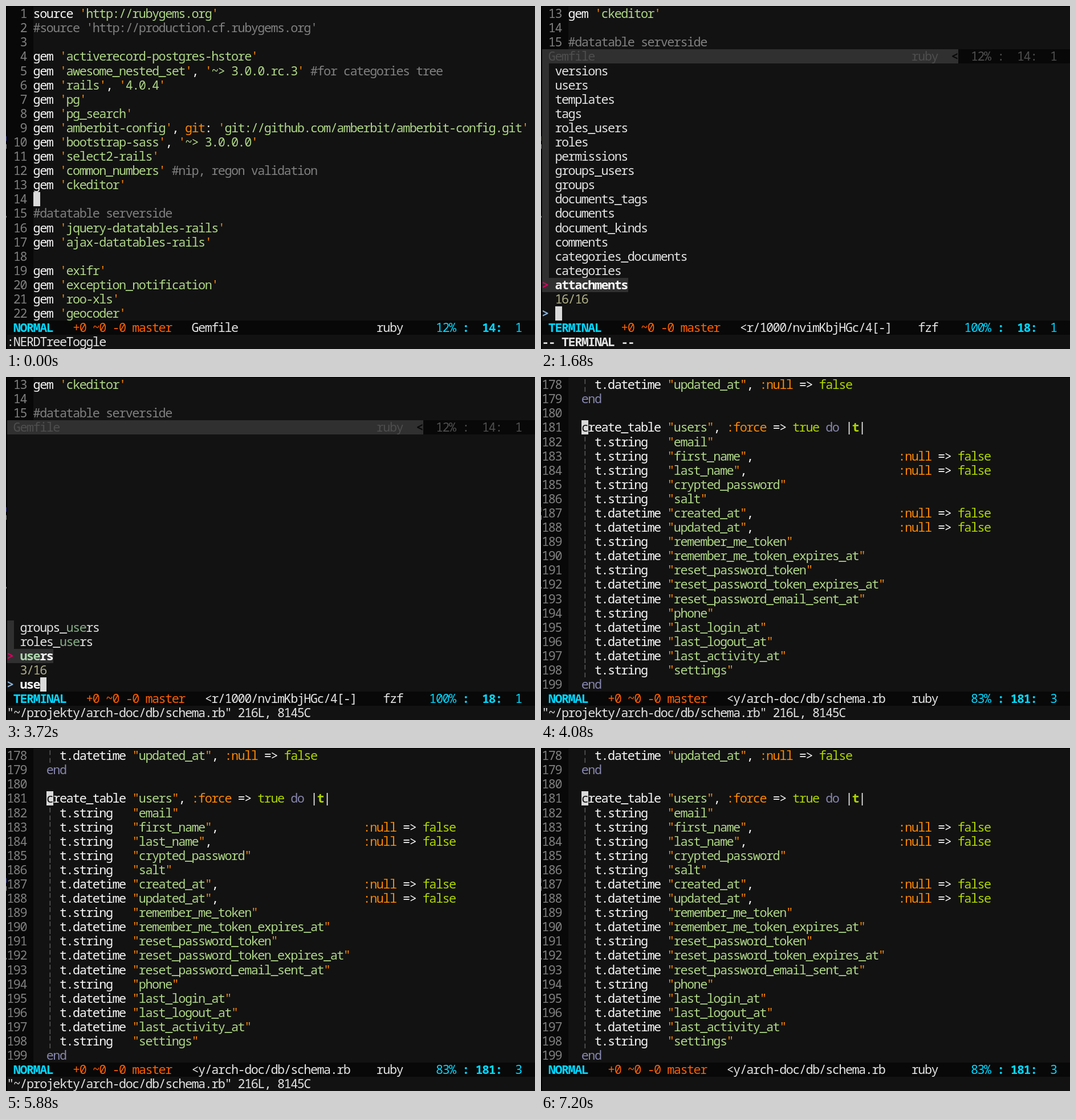
These frames come from a looping animation (928 px wide and 603 px high, 8000 ms). An HTML page with a canvas:

```html
<!DOCTYPE html>
<html lang="en">
<head>
<meta charset="utf-8">
<title>Editor session</title>
<style>
  html, body { margin: 0; width: 100%; height: 100%; overflow: hidden; background: #000; }
  canvas { display: block; }
</style>
</head>
<body>
<canvas id="screen" width="928" height="603"></canvas>
<script>
const ctx = document.getElementById('screen').getContext('2d');
const LOOP = 8000, CELL = 11.58, LINE = 25.09, LEFT = 2, TOP = 1;
const BG = '#121212', DARK = '#080808', PANEL = '#303030', FG = '#f8f8f8', SOFT = '#e4e4e4',
  GREY = '#808080', ORANGE = '#ff8700', GREEN = '#afd787', LIME = '#afd700', MUTED = '#8787af',
  DIM = '#4e4e4e', CYAN = '#00d7ff', YELLOW = '#d7d700', CURSOR = '#dadada', BLUE = '#3465a4';

const gemfile = `source 'http://rubygems.org'
#source 'http://production.cf.rubygems.org'

gem 'activerecord-postgres-hstore'
gem 'awesome_nested_set', '~> 3.0.0.rc.3' #for categories tree
gem 'rails', '4.0.4'
gem 'pg'
gem 'pg_search'
gem 'amberbit-config', git: 'git://github.com/amberbit/amberbit-config.git'
gem 'bootstrap-sass', '~> 3.0.0.0'
gem 'select2-rails'
gem 'common_numbers' #nip, regon validation
gem 'ckeditor'

#datatable serverside
gem 'jquery-datatables-rails'
gem 'ajax-datatables-rails'

gem 'exifr'
gem 'exception_notification'
gem 'roo-xls'
gem 'geocoder'`.split('\n');

const column = (type, name, required) => {
  const start = `  ¦ t.${type.padEnd(8)} "${name}"`;
  return required ? (start + ',').padEnd(50) + ':null => false' : start;
};
const schema = [
  '  ¦ t.datetime "updated_at", :null => false', '  end', '',
  '  create_table "users", :force => true do |t|',
  column('string', 'email'),
  column('string', 'first_name', true),
  column('string', 'last_name', true),
  column('string', 'crypted_password'),
  column('string', 'salt'),
  column('datetime', 'created_at', true),
  column('datetime', 'updated_at', true),
  column('string', 'remember_me_token'),
  column('datetime', 'remember_me_token_expires_at'),
  column('string', 'reset_password_token'),
  column('datetime', 'reset_password_token_expires_at'),
  column('datetime', 'reset_password_email_sent_at'),
  column('string', 'phone'),
  column('datetime', 'last_login_at'),
  column('datetime', 'last_logout_at'),
  column('datetime', 'last_activity_at'),
  column('string', 'settings'),
  '  end'
];

const tables = `attachments categories categories_documents comments document_kinds documents
documents_tags groups groups_users permissions roles roles_users tags templates users versions`.split(/\s+/);

const x = col => LEFT + col * CELL;
const y = row => TOP + row * LINE;

function box(row, col, width, color) {
  const left = Math.round(x(col)), top = Math.round(y(row));
  ctx.fillStyle = color;
  ctx.fillRect(left, top, Math.round(x(col + width)) - left, Math.round(y(row + 1)) - top);
}

function text(row, col, string, color = FG, bold = false) {
  ctx.font = `${bold ? 700 : 500} 21.8px "Noto Sans Mono", monospace`;
  ctx.textAlign = 'center';
  ctx.fillStyle = color;
  [...string].forEach((char, i) => {
    if (char !== ' ') ctx.fillText(char, x(col + i + 0.5), y(row) + 20.2);
  });
}

function code(row, line) {
  const tokens = /#.*|'[^']*'|"[^"]*"|:\w+|\w+(?=:)|\b(?:true|false)\b|\b(?:end|do)\b|\|t\||¦/g;
  let end = 0;
  for (const { 0: token, index } of line.matchAll(tokens)) {
    const col = 4 + index;
    text(row, 4 + end, line.slice(end, index));
    end = index + token.length;
    if (token[0] === '#') text(row, col, token, GREY);
    else if (/['"]/.test(token[0])) {
      text(row, col, token[0], ORANGE);
      text(row, col + 1, token.slice(1, -1), GREEN);
      text(row, 3 + end, token[0], ORANGE);
    } else if (token === '|t|') {
      text(row, col, '| |');
      text(row, col + 1, 't', LIME, true);
    } else if (token === '¦') text(row, col, token, '#585858');
    else text(row, col, token, /true|false/.test(token) ? LIME : /^(end|do)$/.test(token) ? MUTED : ORANGE);
  }
  text(row, 4 + end, line.slice(end));
}

function buffer(lines, first) {
  lines.forEach((line, row) => {
    box(row, 0, 4, DARK);
    text(row, 0, String(first + row).padStart(3), GREY);
    code(row, line);
  });
}

function status(mode, file, type, percent, line, col, color = CYAN) {
  const git = mode.length > 6 ? 12 : 10;
  box(22, 0, 80, DARK);
  text(22, 1, mode, color, true);
  text(22, git, '+0 ~0 -0 master', '#ff5f00');
  text(22, git + 18, file, SOFT);
  text(22, 60 - type.length, type, SOFT);
  text(22, 64, `${percent}%`.padStart(4), color);
  text(22, 69, ':', color, true);
  text(22, 71, `${line}:`.padStart(4), color, true);
  text(22, 77, String(col), color);
}

function clear() {
  ctx.fillStyle = '#000';
  ctx.fillRect(0, 0, 928, 603);
  ctx.fillStyle = BG;
  ctx.fillRect(LEFT, TOP, 926, 602);
  // slivers of the window behind
  ctx.fillStyle = '#3a3a8c';
  ctx.fillRect(0, 229, 1, 8);
  ctx.fillStyle = '#8a8a8a';
  ctx.fillRect(0, 243, 1, 8);
  ctx.fillRect(0, 369, 1, 3);
}

function gemView(cursorOn, keys = '') {
  buffer(gemfile, 1);
  if (cursorOn) box(13, 4, 1, CURSOR);
  status('NORMAL', 'Gemfile', 'ruby', 12, 14, 1);
  text(23, 0, ':NERDTreeToggle', SOFT);
  text(23, 69, keys, SOFT);
}

// Positions of a fuzzy match: scan forward for its end, then back for the shortest span.
function match(name, query) {
  let end = -1;
  for (const char of query) {
    end = name.indexOf(char, end + 1);
    if (end < 0) return null;
  }
  const hits = [];
  for (const char of [...query].reverse()) {
    end = name.lastIndexOf(char, end);
    hits.unshift(end--);
  }
  return hits;
}

function finder(query, message) {
  buffer(gemfile.slice(12, 15), 13);
  box(3, 0, 63, PANEL);
  box(3, 63, 17, DARK);
  text(3, 1, 'Gemfile', DIM);
  text(3, 56, 'ruby', DIM);
  text(3, 62, '<', DARK, true);
  text(3, 65, '12% :  14:  1', DIM);

  const span = hits => hits.length ? hits[hits.length - 1] - hits[0] : 0;
  const found = tables.map(name => ({ name, hits: match(name, query) })).filter(item => item.hits);
  if (query) found.sort((a, b) => span(a.hits) - span(b.hits) || a.name.length - b.name.length);
  found.forEach(({ name, hits }, i) => {
    const row = 19 - i, selected = i === 0;
    box(row, 0, selected ? name.length + 2 : 1, PANEL);
    if (selected) text(row, 0, '>', '#d7005f', true);
    [...name].forEach((char, k) => {
      const color = !hits.includes(k) ? (selected ? FG : SOFT) : selected ? '#afd7af' : '#87af87';
      text(row, 2 + k, char, color, selected);
    });
  });
  text(20, 2, `${found.length}/${tables.length}`, '#afaf87');
  text(21, 0, '>', '#87afd7', true);
  text(21, 2, query, FG, true);
  box(21, 2 + query.length, 1, CURSOR);
  status('TERMINAL', '<r/1000/nvimKbjHGc/4[-]', 'fzf', 100, 18, 1);
  text(23, 0, message || '-- TERMINAL --', SOFT, !message);
}

const fileInfo = '"~/projekty/arch-doc/db/schema.rb" 216L, 8145C';

function schemaView(line, { cursorOn = true, visual = false, message = fileInfo } = {}) {
  const row = line - 178, source = schema[row];
  buffer(schema, 178);
  if (visual) {
    box(row, 4, source.length, BLUE);
    text(row, 4, source.replace('|t|', '| |'));
    text(row, 4 + source.indexOf('|t|') + 1, 't', FG, true);
    box(row, 6, 1, BG);
    text(row, 6, source[2]);
  }
  if (cursorOn) {
    box(row, 6, 1, source[2] === '¦' ? '#626262' : CURSOR);
    text(row, 6, source[2], BG);
  }
  status(visual ? 'V-LINE' : 'NORMAL', '<y/arch-doc/db/schema.rb', 'ruby',
    Math.floor(line / 216 * 100), line, 3, visual ? YELLOW : CYAN);
  text(23, 0, message, SOFT, visual);
  if (visual) text(23, 69, '1', SOFT);
}

const visual = { visual: true, message: '-- WIZUALNY LINIOWY --' };
const scenes = [
  [0, () => gemView(true)],
  [480, () => gemView(false)],
  [1080, () => gemView(true)],
  [1200, () => gemView(true, '<20>')],
  [1440, () => gemView(true, '<20>d')],
  [1680, () => finder('')],
  [2640, () => finder('u')],
  [2760, () => finder('us')],
  [3000, () => finder('use')],
  [3720, () => finder('use', fileInfo)],
  [4080, () => schemaView(181)],
  [4680, () => schemaView(181, { cursorOn: false })],
  [4920, () => schemaView(182)],
  [5400, () => schemaView(183)],
  [5520, () => schemaView(184)],
  [5640, () => schemaView(183)],
  [5760, () => schemaView(182)],
  [5880, () => schemaView(181)],
  [6120, () => schemaView(181, visual)],
  [6720, () => schemaView(181, { ...visual, cursorOn: false })],
  [7200, () => schemaView(181, { message: '' })]
];

let shown;
function tick() {
  const time = performance.now() % LOOP;
  const scene = scenes.findLast(([start]) => start <= time);
  if (scene !== shown) {
    clear();
    scene[1]();
    shown = scene;
  }
  requestAnimationFrame(tick);
}
tick();
</script>
</body>
</html>
```
